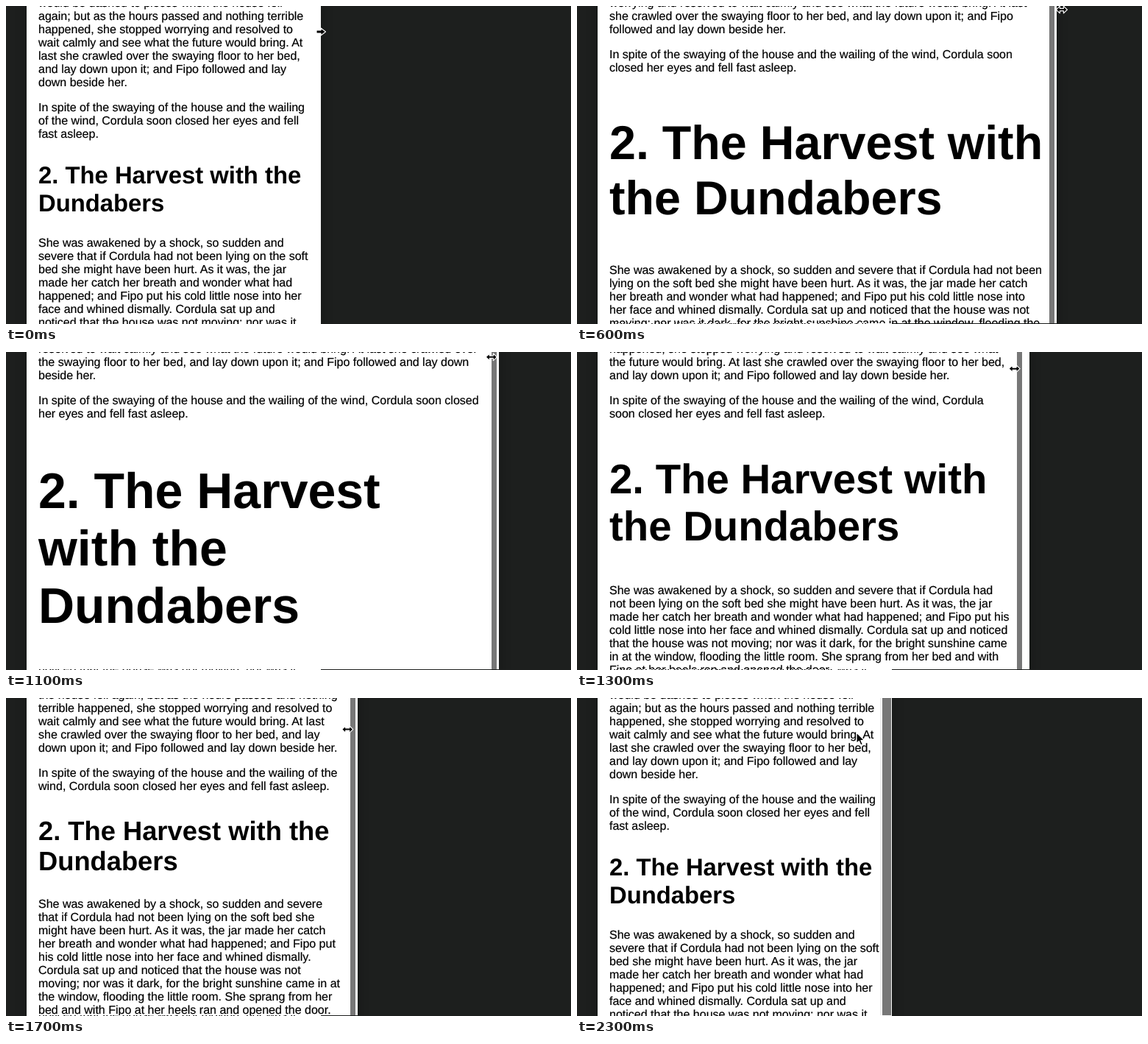
Write an HTML page that moves like this. It is 768x432 px and loops after 2.4 s.

```html
<!DOCTYPE html>
<html lang="en">
<head>
<meta charset="utf-8">
<title>Fluid heading</title>
<style>
  html, body { margin: 0; width: 100%; height: 100%; overflow: hidden; background: #1d1f1e; }
  #stage { position: relative; width: 768px; height: 432px; overflow: hidden; background: #1d1f1e; }
  #stage div, #stage svg { position: absolute; }
  .paper { left: 28px; top: -100px; height: 640px; background: #fff; box-shadow: 0 0 14px rgba(0, 0, 0, .3); }
  .text {
    left: 44px; top: -84px; color: #000;
    font: 16px/18px "Liberation Sans", Arial, Helvetica, sans-serif;
    text-rendering: geometricPrecision;
  }
  .text p { margin: 0 0 16px; -webkit-text-stroke: .2px #000; }
  .text h2 { margin: .83em 0; font-weight: bold; }
  #track { top: 0; height: 432px; width: 16px; background: #fafafa; border-left: 1px solid #ebebeb; box-sizing: border-box; }
  #thumb { top: 0; height: 432px; background: #777; }
  #lastRow { left: 0; top: 431px; width: 768px; height: 1px; overflow: hidden; background: #1d1f1e; }
  #lastRow > div { left: 0; top: -431px; width: 768px; height: 432px; }
  #cursor { left: 0; top: 0; }
</style>
</head>
<body>
<div id="stage">
  <div class="paper" id="paper"></div>
  <div class="text" id="text">
    <p>Hour after hour passed away, and slowly Cordula got over her fright; but she felt quite lonely, and the wind shrieked so loudly all about her that she nearly became deaf. At first she had wondered if she would be dashed to pieces when the house fell again; but as the hours passed and nothing terrible happened, she stopped worrying and resolved to wait calmly and see what the future would bring. At last she crawled over the swaying floor to her bed, and lay down upon it; and Fipo followed and lay down beside her.</p>
    <p>In spite of the swaying of the house and the wailing of the wind, Cordula soon closed her eyes and fell fast asleep.</p>
    <h2>2. The Harvest with the Dundabers</h2>
    <p>She was awakened by a shock, so sudden and severe that if Cordula had not been lying on the soft bed she might have been hurt. As it was, the jar made her catch her breath and wonder what had happened; and Fipo put his cold little nose into her face and whined dismally. Cordula sat up and noticed that the house was not moving; nor was it dark, for the bright sunshine came in at the window, flooding the little room. She sprang from her bed and with Fipo at her heels ran and opened the door.</p>
  </div>
  <div id="track"></div>
  <div id="thumb"></div>
  <div id="lastRow"><div></div></div>
  <svg id="cursor" width="768" height="432">
    <path id="shape" fill="#000" stroke="#fff" stroke-width="1.1" stroke-linejoin="round"/>
  </svg>
</div>
<script>
const $ = id => document.getElementById(id);
const LOOP = 2400, STEP = 100;
const LEFT = 28, PAD = 16, NARROW = 428, WIDE = 668;
const SHRINK = 11, RELEASE = 19, LEAD = .35;

const shapes = {
  right: "M-6-2H0V-5L6.5 0L0 5V2H-6Z",
  both: "M-7.5 0L-2.5-4.8V-1.6H2.5V-4.8L7.5 0L2.5 4.8V1.6H-2.5V4.8Z",
  pointer: "M0 0V14.5L3.4 11.4L5.8 17L8.3 16L5.9 10.5H10.5Z"
};

const clamp = (x, low, high) => Math.max(low, Math.min(high, x));
const part = (x, from, to) => clamp((x - from) / (to - from), 0, 1);
const easeInOut = u => (1 - Math.cos(Math.PI * u)) / 2;
const easeOut = u => u * (2 - u);

// The page eases wider, then is pulled back at a steady speed.
function pageEdge(step) {
  const growing = NARROW + (WIDE - NARROW) * easeInOut(part(step, .4, 7.2));
  const shrinking = 671.2 - 32.6 * (step - SHRINK);
  return clamp(shrinking, NARROW, growing);
}

// The hand runs slightly ahead of the edge and leaves it at the end.
function hand(step) {
  return {
    x: pageEdge(step + LEAD) - 48 * part(step, RELEASE, 23),
    y: 35 - 30 * easeInOut(part(step, 0, 6)) + 42 * easeOut(part(step, 10.8, 20))
  };
}

function layout(edge, step) {
  const width = edge - LEFT;
  const lag = Math.min((edge - NARROW) / 20, step > SHRINK ? Infinity : 2);
  $("paper").style.width = Math.round(edge + lag) - LEFT + "px";
  $("text").style.width = width - 2 * PAD + "px";
  const size = 32 + 56.8 * easeInOut(part(width, 364, 835));
  const heading = $("text").querySelector("h2").style;
  heading.fontSize = size + "px";
  heading.lineHeight = Math.round(1.15 * Math.round(size)) + "px";
}

function scrollbar(edge, step) {
  const wide = step > RELEASE, right = Math.round(edge) - 1, width = wide ? 12 : 7;
  $("track").style.display = wide ? "block" : "none";
  $("track").style.left = right - 15 + "px";
  $("thumb").style.display = step ? "block" : "none";
  $("thumb").style.left = right - width + "px";
  $("thumb").style.width = width + "px";
}

function cursor(step) {
  const { x, y } = hand(step);
  const atLimit = step === 0 || step >= RELEASE - 1;
  const kind = step > RELEASE ? "pointer" : atLimit ? "right" : "both";
  $("shape").setAttribute("d", shapes[kind]);
  $("shape").setAttribute("transform", `translate(${x} ${y})`);
}

function draw(step) {
  const edge = pageEdge(step);
  layout(edge, step);
  scrollbar(edge, step);
  cursor(step);
}

// The bottom pixel row never repaints, so it keeps the narrow layout.
draw(0);
for (const id of ["paper", "text"]) {
  const copy = $(id).cloneNode(true);
  copy.removeAttribute("id");
  $("lastRow").firstElementChild.append(copy);
}

const start = performance.now();
let shown = 0;
function tick(now) {
  const step = Math.floor(Math.max(0, now - start) % LOOP / STEP);
  if (step !== shown) draw(shown = step);
  requestAnimationFrame(tick);
}
requestAnimationFrame(tick);
</script>
</body>
</html>
```
